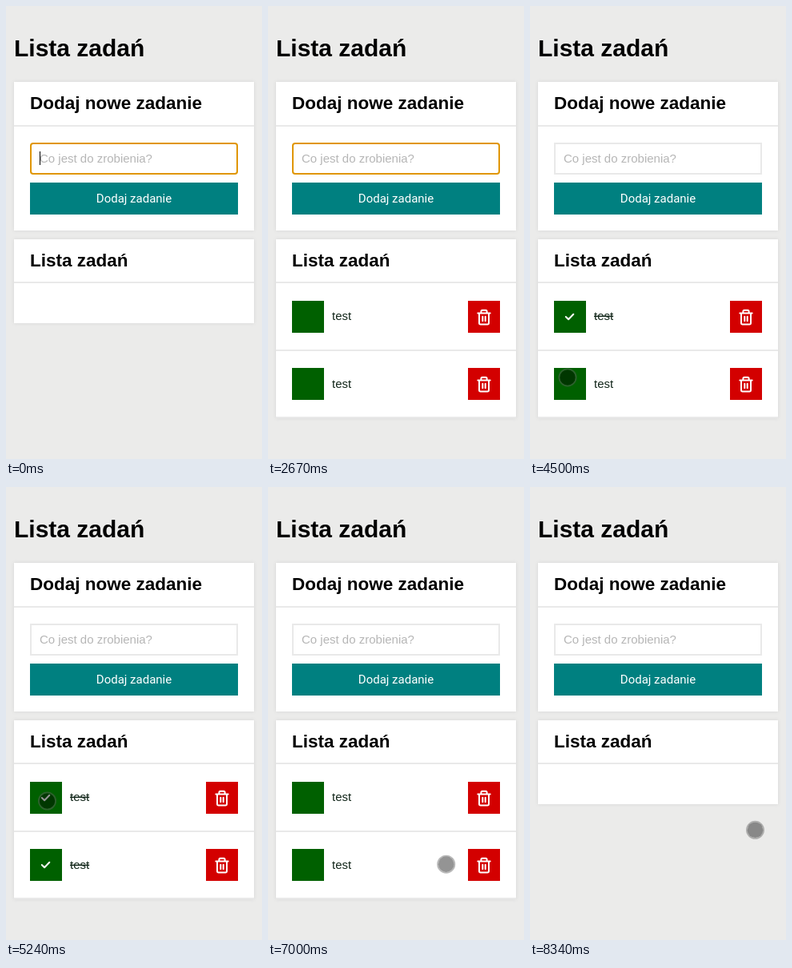
Recreate the animation shown at these times as an HTML page. Size 320 by 567 pixels, loop 8410 ms.

```html
<!DOCTYPE html>
<html lang="pl">
<head>
<meta charset="utf-8">
<title>Lista zadań</title>
<style>
  html, body { margin: 0; width: 100%; height: 100%; overflow: hidden; background: #ebebea; }
  svg { display: block; width: 320px; height: 567px; }
  text { font: 15px "Liberation Sans", Arial, sans-serif; white-space: pre; }
  .title { font-size: 30px; font-weight: bold; }
  .head { font-size: 22.5px; font-weight: bold; }
  .button { font-family: Roboto, sans-serif; fill: #fff; text-anchor: middle; }
  .panel { fill: #fff; filter: drop-shadow(0 0 2px #d5d5d5); }
  .rule { fill: #e9e9e9; }
  .label { fill: #12261a; }
  .done .label { text-decoration: line-through; }
  .check { visibility: hidden; }
  .done .check { visibility: visible; }
  .icon, .check { fill: none; stroke: #fff; stroke-width: 2; stroke-linecap: round; stroke-linejoin: round; }
  #dot { fill: rgba(0, 0, 0, .42); stroke: rgba(100, 100, 100, .45); }
  #ring { fill: none; stroke: rgba(100, 100, 100, .45); stroke-width: 1.8; }
  #dot { stroke: none; }
  .down #dot { fill: rgba(255, 190, 0, .5); }
  .down #ring { stroke: rgba(255, 200, 40, .6); }
</style>
</head>
<body>
<svg viewBox="0 0 320 567">
  <text class="title" x="10" y="63">Lista zadań</text>

  <rect class="panel" x="10" y="95" width="300" height="186"/>
  <text class="head" x="30" y="129">Dodaj nowe zadanie</text>
  <rect class="rule" x="10" y="149" width="300" height="2"/>
  <rect id="field" x="31" y="172" width="258" height="38" fill="#fff" stroke-width="2"/>
  <text id="hint" x="42" y="196" fill="#b6b6b6">Co jest do zrobienia?</text>
  <text id="typed" x="42" y="196"></text>
  <rect id="caret" y="182" width="1" height="17"/>
  <rect x="30" y="221" width="260" height="40" fill="#008080"/>
  <text class="button" x="160" y="246">Dodaj zadanie</text>

  <rect id="list" class="panel" x="10" y="292" width="300"/>
  <text class="head" x="30" y="326">Lista zadań</text>
  <rect class="rule" x="10" y="345" width="300" height="2"/>
  <g id="rows"></g>

  <g id="pointer">
    <circle id="dot" r="9.8"/>
    <circle id="ring" r="10.6"/>
  </g>
</svg>
<script>
const LOOP = 8410;
const WORD = 'test';
const ROW = 84;
const BLINK = 520;

const entries = [{ start: 130, sent: 990 }, { start: 1450, sent: 2340 }];

// The pointer rests at each stop from arrive to release and is down from press on.
const stop = (x, y, arrive, press, release, task, bin) =>
  ({ x, y, arrive, press, release, task, bin });
const stops = [
  stop(209, 413, 3130, 3130, 3130),
  stop(42, 395.5, 3700, 4020, 4220, 0),
  stop(48, 479, 4600, 4850, 4920, 1),
  stop(51.5, 393, 5240, 5440, 5510, 0),
  stop(50, 476, 6050, 6380, 6450, 1),
  stop(262, 471.3, 7210, 7410, 7480, 1, true),
  stop(271, 395, 7810, 8210, 8340, 0, true),
  stop(281.5, 429.3, 8340, LOOP, LOOP)
];

const $ = id => document.getElementById(id);
const show = (el, on) => el.setAttribute('visibility', on ? 'visible' : 'hidden');
const set = (el, attrs) => {
  for (const k in attrs) el.setAttribute(k, attrs[k]);
};

$('rows').innerHTML = entries.map((_, i) => `
  <g transform="translate(0 ${369 + ROW * i})">
    <rect x="30" width="40" height="40" fill="#006000"/>
    <path class="check" d="M44.8 20l3.3 3.2 6.2-6.4"/>
    <text class="label" x="80" y="${24 + i}">${WORD}</text>
    <rect x="250" width="40" height="40" fill="#d30000"/>
    <path class="icon" d="M262.3 15.6h15.4M266.4 15.2v-2q0-1.5 1.5-1.5h4.2q1.5 0 1.5 1.5v2
      M264 16v11.8q0 1.7 1.7 1.7h8.6q1.7 0 1.7-1.7V16M268.3 19.8v5.4M271.7 19.8v5.4"/>
    <rect class="rule" x="10" y="61" width="300" height="2"/>
  </g>`).join('');
const rows = [...$('rows').children];

// Each letter takes a little longer than the one before.
function lettersAt(t) {
  const entry = entries.find(e => t >= e.start && t < e.sent);
  if (!entry) return 0;
  let n = 1;
  while (n < WORD.length && t >= entry.start + 180 * n + 15 * n * n) n++;
  return n;
}

function caretAt(t, count) {
  const last = entries.filter(e => e.sent <= t).pop();
  if (count || !last) return true;
  return Math.floor((t - last.sent + 220) / BLINK) % 2 === 0;
}

function drawForm(t) {
  const count = lettersAt(t);
  const focus = t < stops[1].press;
  const typed = $('typed');
  typed.textContent = WORD.slice(0, count);
  show($('hint'), !count);
  show($('caret'), focus && caretAt(t, count));
  set($('caret'), { x: 42 + Math.floor(count && typed.getComputedTextLength()) });
  set($('field'), { stroke: focus ? '#e09600' : '#e9e9e9', rx: focus ? 3 : 0 });
}

function drawList(t) {
  let count = 0;
  rows.forEach((row, i) => {
    const clicks = stops.filter(s => s.task === i && s.release <= t);
    const alive = t >= entries[i].sent && !clicks.some(s => s.bin);
    count += alive;
    set(row, {
      display: alive ? 'inline' : 'none',
      class: clicks.length % 2 ? 'done' : ''
    });
  });
  set($('list'), { height: count ? 56 + ROW * count : 105 });
}

function drawPointer(t) {
  const next = stops.findIndex(s => s.release > t);
  show($('pointer'), next > 0);
  if (next < 1) return;
  const a = stops[next - 1], b = stops[next];
  const p = t < b.arrive ? (t - a.release) / (b.arrive - a.release) : 1;
  const e = p * p * (3 - 2 * p);
  const down = t >= b.press;
  const x = a.x + (b.x - a.x) * e, y = a.y + (b.y - a.y) * e;
  set($('pointer'), {
    class: down ? 'down' : '',
    transform: `translate(${x} ${y}) scale(${down ? 1.06 : 1})`
  });
}

function draw(t) {
  drawForm(t);
  drawList(t);
  drawPointer(t);
}

const start = performance.now();
function tick() {
  draw((performance.now() - start) % LOOP);
  requestAnimationFrame(tick);
}
draw(0);
requestAnimationFrame(tick);
</script>
</body>
</html>
```
